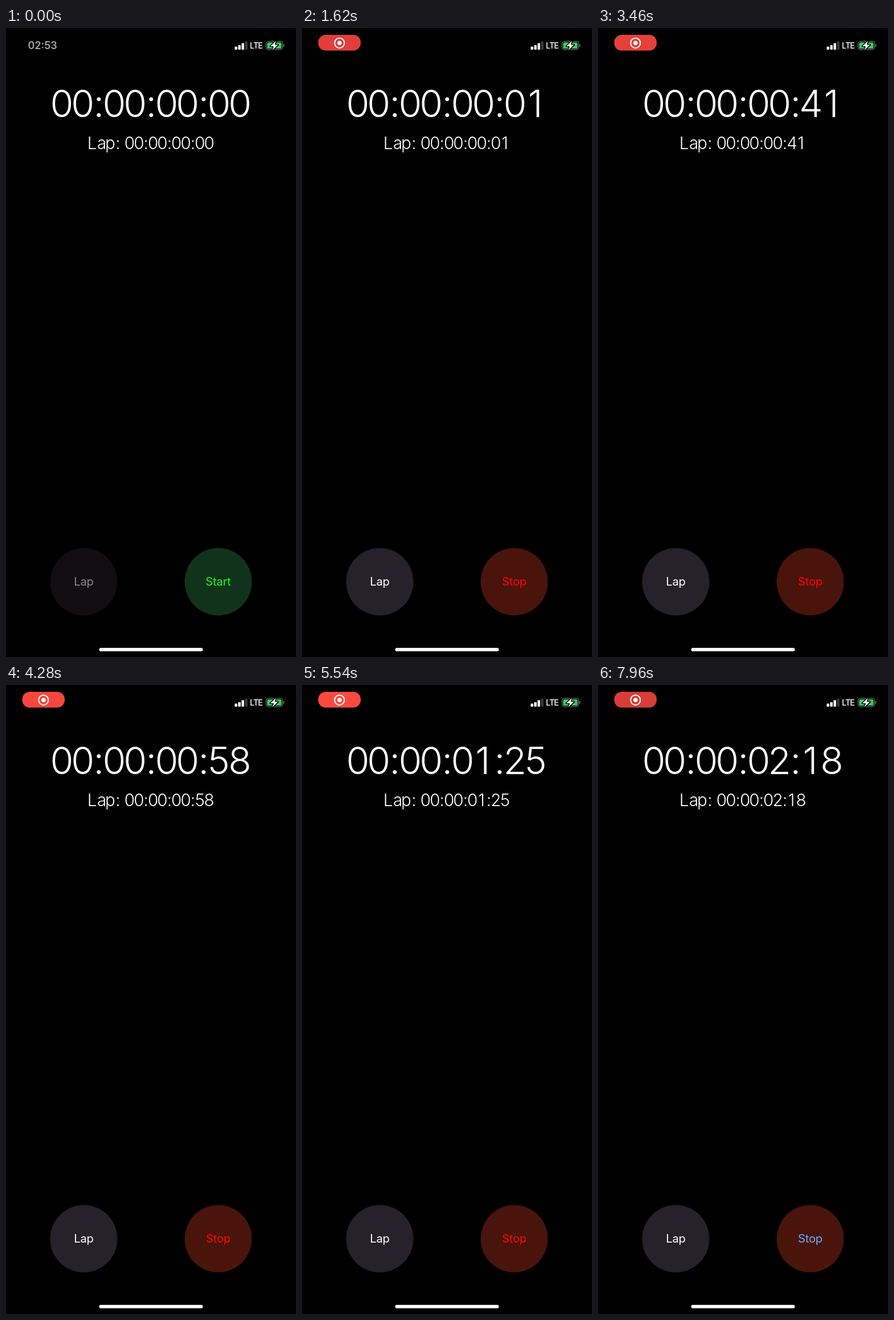
Animation of 509 by 1101 pixels, one loop 8 s. Source, as an HTML page with a canvas:

```html
<!DOCTYPE html>
<html lang="en">
<head>
<meta charset="utf-8">
<title>Stopwatch</title>
<style>
html, body { margin: 0; width: 100%; height: 100%; overflow: hidden; background: #000; }
canvas { display: block; }
</style>
</head>
<body>
<canvas id="stage" width="509" height="1101"></canvas>
<script>
const ctx = document.getElementById('stage').getContext('2d');
const LOOP = 8000;
const FIRST_TICK = 80;    // regular stepping begins here
const RUN_STEP = 32;      // step at which the stopwatch reads zero and runs
const STOP_STEP = 31;     // buttons switch to the running state
const TOUCH_BLUE = '#69adff';

const clamp = v => Math.max(0, Math.min(1, v));
const mix = (a, b, k) => `rgb(${a.map((v, i) => Math.round(v + (b[i] - v) * k))})`;
const pad = v => String(v).padStart(2, '0');

// Steps come in threes: two of 20 ms, then one of 100 ms.
function stepAt(t) {
  if (t < FIRST_TICK) return Math.min(2, Math.floor(t / 20)) - 3;
  const s = t - FIRST_TICK;
  return 3 * Math.floor(s / 140) + Math.min(2, Math.floor(s % 140 / 20));
}

// The last field counts sixtieths of a second.
function clockText(ticks) {
  const sec = Math.floor(ticks / 60);
  return [sec / 3600, sec / 60 % 60, sec % 60, ticks % 60].map(v => pad(Math.floor(v))).join(':');
}

function fillRound(x, y, w, h, r, color) {
  ctx.fillStyle = color;
  ctx.beginPath();
  ctx.roundRect(x, y, w, h, r);
  ctx.fill();
}

function fillCircle(x, y, r, color) {
  ctx.fillStyle = color;
  ctx.beginPath();
  ctx.arc(x, y, r, 0, 2 * Math.PI);
  ctx.fill();
}

function label(text, x, y, size, weight, color, align = 'left', spacing = 0) {
  ctx.font = `${weight} ${size}px Inter, "Liberation Sans", sans-serif`;
  ctx.letterSpacing = spacing + 'px';
  ctx.textAlign = align;
  ctx.fillStyle = color;
  ctx.fillText(text, x, y);
}

// Light text with tabular digits, each glyph centred in its cell.
const cellWidth = { ':': 0.278, ' ': 0.278, L: 0.537, a: 0.519, p: 0.574 };

function tabular(text, x, y, size) {
  ctx.font = `300 ${size}px Inter, "Liberation Sans", sans-serif`;
  ctx.letterSpacing = '0px';
  ctx.textAlign = 'left';
  ctx.fillStyle = '#fff';
  for (const ch of text) {
    const w = (cellWidth[ch] || 0.556) * size;
    const box = ctx.measureText(ch);
    const ink = (box.actualBoundingBoxRight - box.actualBoundingBoxLeft) / 2;
    const shift = ch === '1' ? -0.045 * size : 0;
    ctx.fillText(ch, x + w / 2 - ink + shift, y);
    x += w;
  }
}

function drawRecording(step) {
  const age = step + 3;
  ctx.globalAlpha = clamp(1 - age / 8);
  label('02:53', 38.5, 37, 18, 600, '#aaa5a7');

  const glow = (1 - Math.cos((step - 50) / 120 * 2 * Math.PI)) / 2;
  ctx.globalAlpha = clamp(age / 14);
  fillRound(28.5, 12, 74.5, 27.5, 13, mix([218, 60, 55], [255, 73, 64], glow));
  ctx.strokeStyle = '#fff';
  ctx.lineWidth = 2;
  ctx.beginPath();
  ctx.arc(65.8, 26.3, 8.6, 0, 2 * Math.PI);
  ctx.stroke();
  fillCircle(65.8, 26.3, 3.8, '#fff');
  ctx.globalAlpha = 1;
}

function drawStatus() {
  [5.5, 8, 11.5, 14.5].forEach((h, i) =>
    fillRound(401.5 + 6 * i, 38 - h, 4.4, h, 1.2, i < 3 ? '#fff' : '#3a3a3a'));
  label('LTE', 428, 36, 14.4, 500, '#fff', 'left', -0.9);

  ctx.strokeStyle = '#77777a';
  ctx.lineWidth = 1.2;
  ctx.beginPath();
  ctx.roundRect(456.4, 23.3, 29, 14.6, 4.4);
  ctx.stroke();
  fillRound(458.3, 25.2, 25.2, 10.8, 2.6, '#35d05c');
  fillRound(486.7, 28.2, 1.6, 5, 0.8, '#77777a');

  ctx.beginPath();
  [[474, 22.5], [464, 32], [470, 32], [467.5, 39], [477.5, 29.3], [471.6, 29.3]]
    .forEach(p => ctx.lineTo(...p));
  ctx.closePath();
  ctx.lineJoin = 'round';
  ctx.strokeStyle = '#000';
  ctx.lineWidth = 3;
  ctx.stroke();
  ctx.fillStyle = '#fff';
  ctx.fill();
}

function drawButton(x, text, fill, color) {
  fillCircle(x, 969.3, 59, fill);
  label(text, x, 976.3, 20.2, 400, color, 'center', -0.2);
}

function draw(t) {
  const step = stepAt(t);
  const running = step >= STOP_STEP;
  const touched = step >= 166 || (step >= 25 && !running);
  const time = clockText(Math.max(0, step - RUN_STEP));

  ctx.fillStyle = '#000';
  ctx.fillRect(0, 0, 509, 1101);
  drawRecording(step);
  drawStatus();
  tabular(time, 79.6, 156, 66.2);
  tabular('Lap: ' + time, 143.8, 212, 29.6);

  if (running) {
    drawButton(136.5, 'Lap', '#26222b', '#fff');
    drawButton(372.5, 'Stop', '#49140b', touched ? TOUCH_BLUE : '#ff0800');
  } else {
    drawButton(136.5, 'Lap', '#110d10', '#8c858d');
    drawButton(372.5, 'Start', '#11331b', touched ? TOUCH_BLUE : '#18fb1a');
  }
  fillRound(163.5, 1085, 182, 6, 3, '#fff');
}

const start = performance.now();
function tick() {
  draw((performance.now() - start) % LOOP);
  requestAnimationFrame(tick);
}
tick();
</script>
</body>
</html>
```
